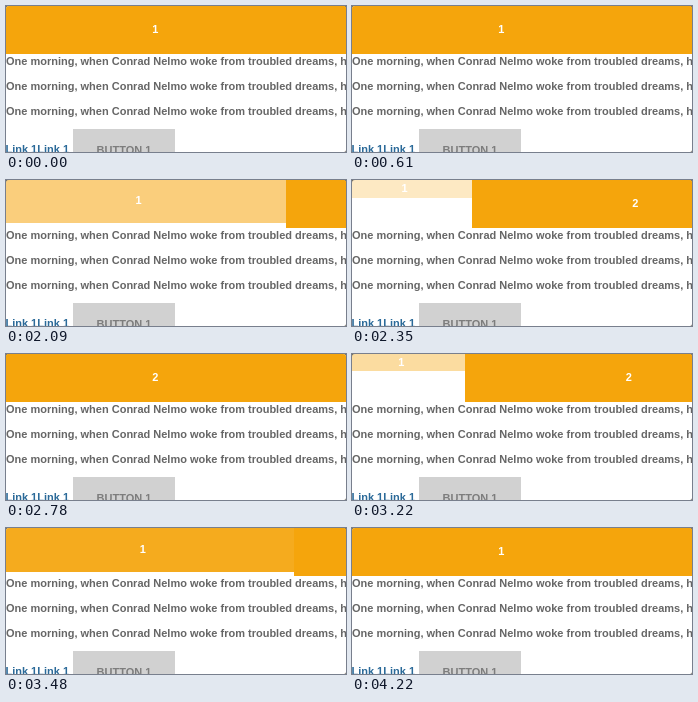
These frames come from a looping animation (340 px wide and 146 px high, 4.75 s). An HTML page:

```html
<!DOCTYPE html>
<html lang="en">
<head>
<meta charset="utf-8">
<title>Slide toggle</title>
<style>
  html, body { margin: 0; width: 100%; height: 100%; overflow: hidden; background: #6b6558; }
  #stage {
    position: relative; width: 340px; height: 146px; overflow: hidden;
    background: #fff; border-radius: 3px 3px 2px 0;
    font: bold 11px "Liberation Sans", Arial, sans-serif;
  }
  .slide {
    position: absolute; top: -2px; height: 50px; overflow: hidden;
    display: flex; align-items: center; justify-content: center;
    background: #f5a50c; color: #fff; white-space: nowrap;
  }
  .rest { position: absolute; top: 0; width: 700px; height: 48px; background: #f5a50c; }
  svg { position: absolute; left: 0; top: 0; }
</style>
</head>
<body>
<div id="stage">
  <div class="slide" id="one">1</div>
  <div class="rest" id="rest"></div>
  <div class="slide" id="two">2</div>
  <svg width="340" height="146" fill="#666">
    <g id="lines"></g>
    <text x="63" y="147" text-anchor="end" fill="#2b6a99">Link 1Link 1</text>
    <rect x="67" y="123" width="102" height="30" fill="#d1d1d1"/>
    <text x="118" y="148" text-anchor="middle" fill="#7d7d7d">BUTTON 1</text>
  </svg>
</div>
<script>
const LOOP = 4750, LEFT = -14.5, WIDTH = 327.5, HEIGHT = 50;
const $ = id => document.getElementById(id);
const one = $('one'), two = $('two'), rest = $('rest');

const line = 'One morning, when Conrad Nelmo woke from troubled dreams, he found himself';
$('lines').innerHTML = [59, 84, 109].map(y => `<text x="0" y="${y}">${line}</text>`).join('');

// [time, phase]: hide the first slide, then show it again
const hide = [[1940, 0], [2090, .205], [2350, .557], [2480, .705], [2780, 1]];
const show = [[2940, 0], [3350, .626], [3600, 1]];

function track(steps, t) {
  if (t <= steps[0][0]) return steps[0][1];
  for (let i = 1; i < steps.length; i++) {
    const [a, u] = steps[i - 1], [b, v] = steps[i];
    if (t < b) return u + (v - u) * (t - a) / (b - a);
  }
  return steps[steps.length - 1][1];
}

const swing = x => .5 - Math.cos(Math.PI * x) / 2;

function draw(t) {
  const back = t >= 2940;
  const size = back ? swing(track(show, t)) : 1 - swing(track(hide, t));
  const dim = Math.min(1, Math.max(0, (t - 1270) / 270));
  const base = back ? 1 : 1 - .4 * (1 - (1 - dim) ** 3);
  const edge = LEFT + WIDTH * size;

  one.style.left = LEFT + 'px';
  one.style.width = WIDTH * size + 'px';
  one.style.height = HEIGHT * size + 'px';
  one.style.opacity = base * size;
  rest.style.left = two.style.left = edge + 'px';
  two.style.width = WIDTH + 'px';
}

function tick() {
  draw(performance.now() % LOOP);
  requestAnimationFrame(tick);
}
tick();
</script>
</body>
</html>
```
